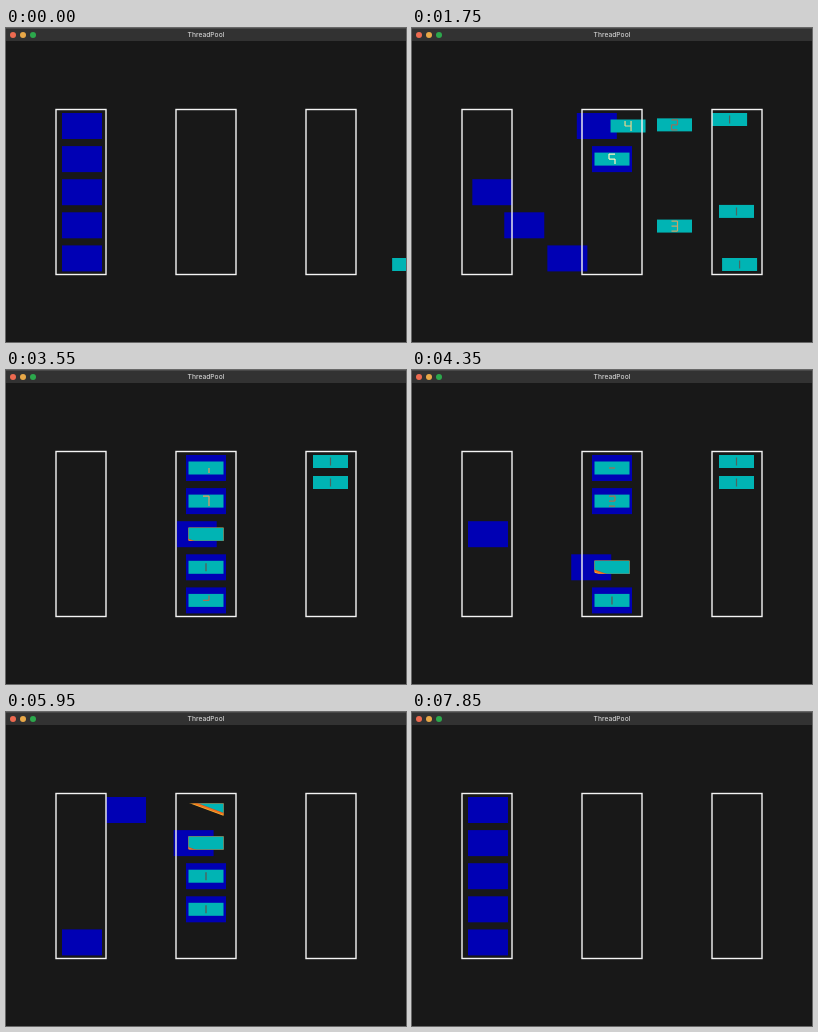
These frames come from a looping animation (400 px wide and 314 px high, 7950 ms). An HTML page with a canvas:

```html
<!DOCTYPE html>
<html lang="en">
<head>
<meta charset="utf-8">
<title>ThreadPool</title>
<style>
  html, body { margin: 0; width: 100%; height: 100%; overflow: hidden; background: #181818; }
  canvas { display: block; position: absolute; left: 0; top: 0; }
  header {
    position: absolute; left: 0; top: 0; width: 400px; height: 13px;
    background: #323232; box-shadow: inset 0 1px #484848; color: #d0d0d0;
    font: 500 6.7px/14px Inter, "Open Sans", sans-serif; text-align: center;
  }
  i { position: absolute; top: 4px; width: 6px; height: 6px; border-radius: 50%; }
</style>
</head>
<body>
<canvas id="stage" width="400" height="314"></canvas>
<header>
  <i style="left:4px;background:#ed6a50"></i>
  <i style="left:14px;background:#e8a848"></i>
  <i style="left:24px;background:#2ca84c"></i>
  ThreadPool
</header>
<script>
const ctx = document.getElementById('stage').getContext('2d');
const LOOP = 7950, MOVE = 800, W = 35, H = 13;
const HOME = 56, BUSY = 180, QUEUE = 307, TOP = 85, SLOT = 21;

// seconds of work, worker row, then the times of entering, dispatch and completion
const tasks = [
  [5, 1, -105, 708, 5870],
  [4, 0, 248, 1048, 5434],
  [3, 4, 440, 1238, 4715],
  [2, 3, 716, 1516, 4216],
  [1, 2, 930, 1722, 3490],
  [1, 2, 1235, 4410, 6190],
  [1, 3, 1379, 5050, 6800],
].map(([n, row, enter, start, done]) => ({ n, row, enter, start, done }));

const SEGMENTS = {
  a: [-3, -5, 3, -5], b: [3, -5, 3, 0], c: [3, 0, 3, 5], d: [-3, 5, 3, 5],
  e: [-3, 0, -3, 5], f: [-3, -5, -3, 0], g: [-3, 0, 3, 0],
};
const DIGITS = [, 'bc', 'gbade', 'cbagd', 'bcgf', 'fagcd'];
const INK = [, '#4c6660', '#94705c', '#c8a468', '#ecd68c', '#fff4c4'];
const RUN_INK = [, '#5c5450', '#a86c54', '#e89860', '#ecc080', '#fff4c4'];

const clamp = v => Math.max(0, Math.min(1, v));
const rowY = row => TOP + 33.1 * row;

// Point at fraction p of a polyline's length
function along(points, p) {
  const legs = points.slice(1).map(([x, y], i) => Math.hypot(x - points[i][0], y - points[i][1]));
  let left = clamp(p) * legs.reduce((a, b) => a + b);
  for (let i = 0; i < legs.length; i++) {
    if (left <= legs[i] || i === legs.length - 1) {
      const k = legs[i] ? Math.min(1, left / legs[i]) : 1, [x, y] = points[i], [u, v] = points[i + 1];
      return [x + (u - x) * k, y + (v - y) * k];
    }
    left -= legs[i];
  }
}

function position(task, index, t) {
  const last = index === tasks.length - 1;
  if (t < task.start) {
    const slotY = last ? TOP + SLOT : TOP;
    const [x, y] = along([[420, 230], [QUEUE, 230], [QUEUE, slotY]], (t - task.enter) / MOVE);
    const shift = last ? SLOT * clamp((t - tasks[index - 1].start) / 400) : 0;
    return [x, y - shift];
  }
  const y = rowY(task.row) + 6.5;
  return along([[QUEUE, TOP], [245, TOP], [245, y], [182.5, y]], (t - task.start) / MOVE);
}

function drawDigit(task, cx, cy, t) {
  const begin = task.start + MOVE, running = t > begin;
  const remaining = running ? task.n * (task.done - t) / (task.done - begin) : task.n;
  const n = Math.max(1, Math.ceil(remaining));
  const strokes = DIGITS[n];
  const share = running && n > 1 ? remaining - n + 1 : 1;
  const count = Math.max(1, Math.round(strokes.length * share));
  const dx = n === 1 ? -3 : 0, squash = n === 1 ? 0.8 : 1;
  ctx.strokeStyle = (running ? RUN_INK : INK)[n];
  ctx.lineWidth = 1.2;
  ctx.beginPath();
  for (const s of strokes.slice(0, count)) {
    const [x, y, u, v] = SEGMENTS[s];
    ctx.moveTo(cx + dx + x, cy + y * squash);
    ctx.lineTo(cx + dx + u, cy + v * squash);
  }
  ctx.stroke();
}

// Fills the part of a box above its rising diagonal; cut runs from 0 to 1
function fillBeyond(x, y, cut, color) {
  const k = 2 * clamp(cut);
  ctx.save();
  ctx.beginPath();
  ctx.rect(x, y, W, H);
  ctx.clip();
  ctx.beginPath();
  ctx.moveTo(x + W * (k - 2), y - H);
  ctx.lineTo(x + W * (k + 1), y + H * 2);
  ctx.lineTo(x + W * 4, y + H * 2);
  ctx.lineTo(x + W * 4, y - H);
  ctx.closePath();
  // The line crosses the left edge at height 1 - k and the bottom edge at k
  ctx.fillStyle = color;
  ctx.beginPath();
  ctx.moveTo(x - W, y + H * (1 - k) - H);
  ctx.lineTo(x + W * 2, y + H * (3 - k));
  ctx.lineTo(x + W * 2, y - H * 3);
  ctx.lineTo(x - W, y - H * 3);
  ctx.fill();
  ctx.restore();
}

function drawTask(task, index, t) {
  const burn = (t - task.done) / MOVE;
  if (t < task.enter || burn >= 1) return;
  const [x, y] = position(task, index, t);
  if (burn > 0) {
    fillBeyond(x, y, burn - 0.12, '#f8b030');
    fillBeyond(x, y, burn - 0.09, '#f07820');
    fillBeyond(x, y, burn - 0.02, '#d84818');
    fillBeyond(x, y, burn, '#00b4b4');
  } else {
    ctx.fillStyle = '#00b4b4';
    ctx.fillRect(x, y, W, H);
    drawDigit(task, x + W / 2, y + H / 2, t);
  }
}

function workerX(row, t) {
  const job = tasks.filter(k => k.row === row && k.start <= t).pop();
  if (!job) return HOME;
  const p = clamp((t - job.start) / MOVE) - clamp((t - job.done) / MOVE);
  return HOME + (BUSY - HOME) * p;
}

function draw(t) {
  ctx.fillStyle = '#181818';
  ctx.fillRect(0, 0, 400, 314);
  ctx.fillStyle = '#0000b4';
  for (let row = 0; row < 5; row++) ctx.fillRect(workerX(row, t), rowY(row), 40, 26);
  tasks.forEach((task, i) => drawTask(task, i, t));
  ctx.strokeStyle = '#f4f4f4';
  ctx.lineWidth = 1.4;
  for (const [x, w] of [[50, 50], [170, 60], [300, 50]]) ctx.strokeRect(x, 81.5, w, 165);
}

const origin = performance.now();
function tick() {
  const t = (performance.now() - origin) % LOOP;
  draw(Math.floor(t / 50) * 50);
  requestAnimationFrame(tick);
}
tick();
</script>
</body>
</html>
```
